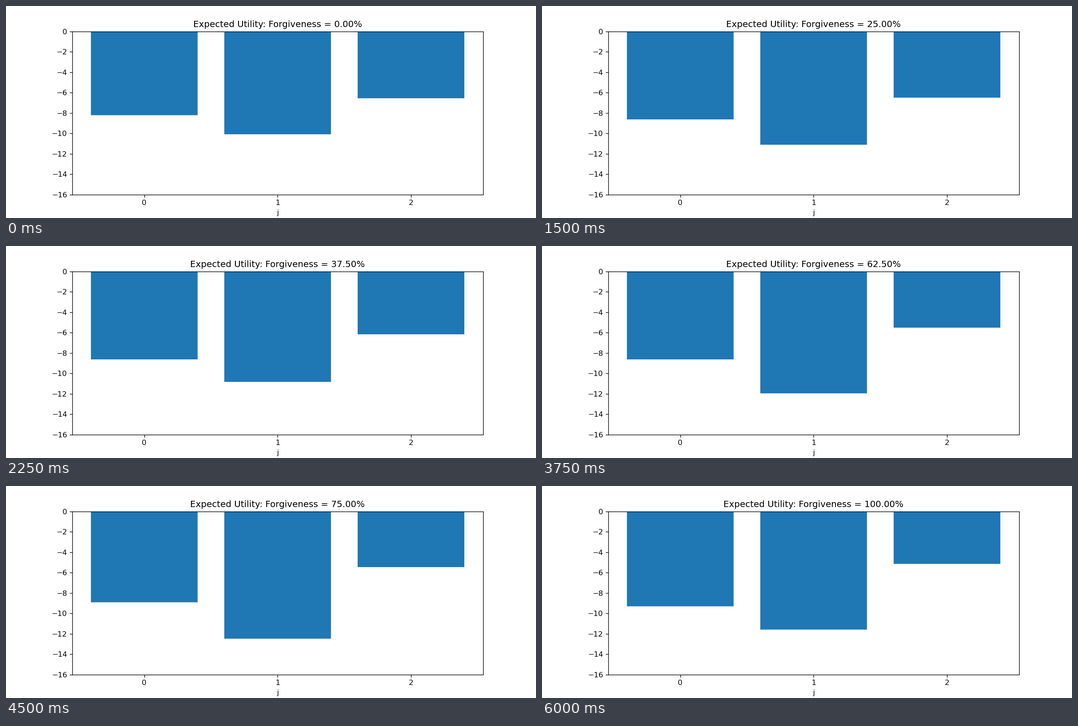
Write a matplotlib script that moves like this. It is 1183 px wide and 473 px high and loops after 6750 ms.

```python
import numpy as np
import matplotlib.pyplot as plt
from matplotlib.animation import FuncAnimation

DPI = 118.3
STEPS = 8

# Depth of each bar: straight runs between (step, value) turning points
TURNS = [
    [(0, 8.21), (2, 8.62), (5, 8.62), (7, 9.19), (8, 9.30)],
    [(0, 10.08), (1, 11.38), (4, 10.55), (5, 11.95), (6, 12.47),
     (7, 11.06), (8, 11.58)],
    [(0, 6.55), (2, 6.49), (5, 5.51), (7, 5.40), (8, 5.14)],
]


def utility(j, step):
    return -np.interp(step, *zip(*TURNS[j]))


fig, ax = plt.subplots(figsize=(10, 473 / DPI), dpi=DPI)
bars = ax.bar(range(3), [utility(j, 0) for j in range(3)], snap=False)
ax.set_ylim(-16, 0)
ax.set_xticks(range(3))
ax.set_xlabel("j")


def update(step):
    for j, bar in enumerate(bars):
        bar.set_height(utility(j, step))
    ax.set_title(f"Expected Utility: Forgiveness = {step / STEPS:.2%}")
    return list(bars)


anim = FuncAnimation(fig, update, frames=STEPS + 1, interval=750,
                     repeat=True, repeat_delay=0, blit=False)
plt.show()
```
